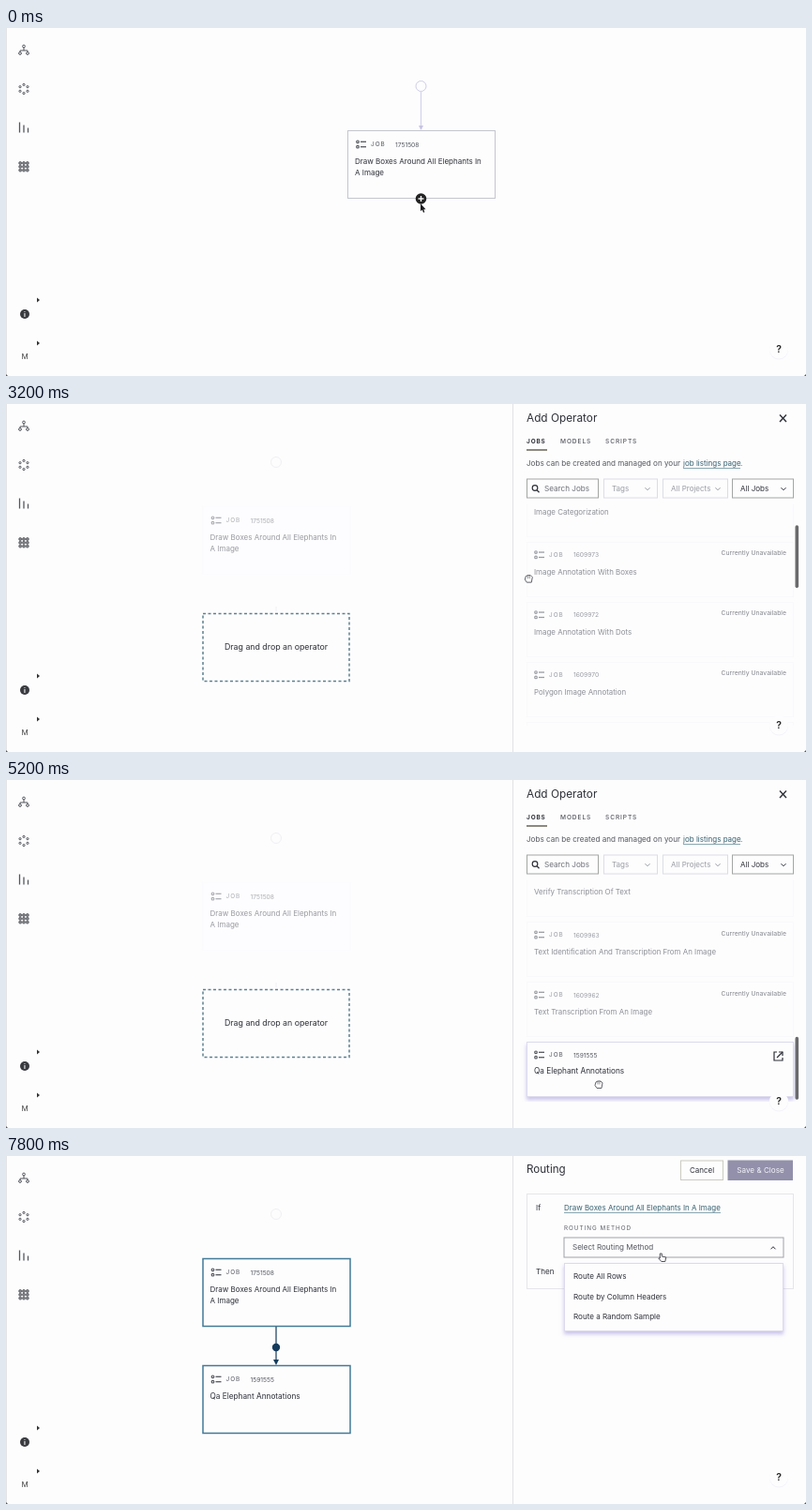
An HTML page with a canvas for the animation above (8 s loop, 853 px wide and 371 px high).

```html
<!DOCTYPE html>
<html lang="en">
<head>
<meta charset="utf-8">
<title>Workflow editor</title>
<style>
  html, body { margin: 0; width: 100%; height: 100%; overflow: hidden; background: #fdfdfe; }
  canvas { display: block; width: 853px; height: 371px; }
</style>
</head>
<body>
<canvas id="stage" width="853" height="371"></canvas>
<script>
const ctx = document.getElementById('stage').getContext('2d');
const W = 853, H = 371, LOOP = 8000, STEP = 200;
const PANEL_W = 312, NODE_SHIFT = 154.5, MAX_SCROLL = 589, ROW = 64;
const INK = '#2e3038', GREY = '#9a9ca3', PALE = '#f0f0f4', BLUE = '#427a96', NAVY = '#153b5c', PAPER = '#fdfdfe';

const JOBS = [
  ['1751508', 'Draw Boxes Around All Elephants In A Image'],
  ['1609975', 'Image Categorization'], ['1609973', 'Image Annotation With Boxes'],
  ['1609972', 'Image Annotation With Dots'], ['1609970', 'Polygon Image Annotation'],
  ['1609969', 'Pixel Labeling Of An Image'], ['1609968', 'Text Annotation'],
  ['1609967', 'Sentiment Of A Sentence'], ['1609965', 'Audio Transcription'],
  ['1609964', 'Verify Transcription Of Text'],
  ['1609963', 'Text Identification And Transcription From An Image'],
  ['1609962', 'Text Transcription From An Image'],
  ['1591555', 'Qa Elephant Annotations']
];
const QA_JOB = JOBS[JOBS.length - 1];

const clamp = v => Math.max(0, Math.min(1, v));
const smooth = u => u * u * (3 - 2 * u);

// keys: [time, value, value...], eased between neighbours
function track(t, keys) {
  const next = keys.findIndex(k => k[0] > t);
  if (next < 0) return keys[keys.length - 1].slice(1);
  if (next === 0) return keys[0].slice(1);
  const a = keys[next - 1], b = keys[next];
  const u = smooth((t - a[0]) / (b[0] - a[0]));
  return a.slice(1).map((v, i) => v + (b[i + 1] - v) * u);
}

function text(str, x, y, size = 8.05, color = INK, { weight = 400, spacing = 0, align = 'left' } = {}) {
  ctx.font = `${weight} ${size}px Inter, sans-serif`;
  ctx.letterSpacing = spacing + 'px';
  ctx.textAlign = align;
  ctx.textBaseline = 'middle';
  ctx.fillStyle = color;
  ctx.fillText(str, x, y);
}

function line(points, color = INK, width = 1) {
  ctx.strokeStyle = color;
  ctx.lineWidth = width;
  ctx.beginPath();
  points.forEach(([x, y]) => ctx.lineTo(x, y));
  ctx.stroke();
}

function polygon(points, fill, stroke) {
  ctx.beginPath();
  points.forEach(([x, y]) => ctx.lineTo(x, y));
  ctx.closePath();
  if (fill) { ctx.fillStyle = fill; ctx.fill(); }
  if (stroke) { ctx.strokeStyle = stroke; ctx.lineWidth = 1; ctx.stroke(); }
}

function circle(x, y, r, fill, stroke, width = 1) {
  ctx.beginPath();
  ctx.arc(x, y, r, 0, Math.PI * 2);
  if (fill) { ctx.fillStyle = fill; ctx.fill(); }
  if (stroke) { ctx.strokeStyle = stroke; ctx.lineWidth = width; ctx.stroke(); }
}

function box(x, y, w, h, stroke, fill, width = 1, dash = []) {
  if (fill) { ctx.fillStyle = fill; ctx.fillRect(x, y, w, h); }
  if (!stroke) return;
  ctx.setLineDash(dash);
  ctx.strokeStyle = stroke;
  ctx.lineWidth = width;
  ctx.strokeRect(x + .5, y + .5, w - 1, h - 1);
  ctx.setLineDash([]);
}

function raisedBox(x, y, w, h) {
  ctx.save();
  ctx.shadowColor = 'rgba(150,140,215,.5)';
  ctx.shadowBlur = 4;
  ctx.shadowOffsetY = 3;
  box(x, y, w, h, null, PAPER);
  ctx.restore();
  box(x, y, w, h, '#dcdaec');
}

function chevron(x, y, color, dir = 1) {
  line([[x - 2.5, y - 1.3 * dir], [x, y + 1.3 * dir], [x + 2.5, y - 1.3 * dir]], color);
}

function underlined(str, x, y, size, width) {
  text(str, x, y, size, '#35606f');
  line([[x, y + 4.5], [x + width, y + 4.5]], '#6f929e', .8);
}

function jobHeader(x, y, id, color) {
  for (const dy of [-2.7, 2.7]) {
    circle(x + 2, y + dy, 1.3, null, color, 1.2);
    line([[x + 5, y + dy], [x + 11, y + dy]], color, 1.3);
  }
  text('JOB', x + 16, y + .5, 6.4, color, { spacing: 1 });
  text(id, x + 42, y + .5, 6.7, color);
}

function sidebar() {
  const c = '#55575e';
  line([[19, 20], [19, 24], [15, 24], [15, 27]], c);
  line([[19, 24], [23, 24], [23, 27]], c);
  [[19, 19.5], [15, 27], [23, 27]].forEach(([x, y]) => circle(x, y, 1.4, PAPER, c));
  for (let i = 0; i < 6; i++) {
    const a = i * Math.PI / 3 + Math.PI / 6;
    circle(19 + 4.6 * Math.cos(a), 65 + 4.6 * Math.sin(a), 1.1, PAPER, c);
  }
  line([[14.5, 100.5], [14.5, 111.5]], c, 1.3);
  line([[19, 103.5], [19, 111.5]], c, 1.3);
  line([[23.5, 106.5], [23.5, 111.5]], c, 1.3);
  for (let i = 0; i < 9; i++) circle(15.2 + i % 3 * 3.8, 144 + Math.floor(i / 3) * 3.8, 1.5, '#85878c', c, .8);
  for (const y of [290, 336]) polygon([[33, y - 2.5], [36, y], [33, y + 2.5]], '#333');
  circle(20, 305, 5, '#3a3b40');
  text('i', 20, 305.5, 7, '#fff', { weight: 700, align: 'center' });
  text('M', 20, 351, 8, '#444', { align: 'center' });
}

function node(x, y, job, border) {
  box(x, y, 158, 73, border, PAPER, border === BLUE ? 1.5 : 1);
  jobHeader(x + 9, y + 15, job[0], '#55575e');
}

function flow(t, slide, connected) {
  const x = 364 - NODE_SHIFT * slide, mid = x + 78.5;
  const editing = slide > 0;
  circle(mid, 62, 5.5, null, editing ? PALE : '#cfcde6');
  if (!editing) {
    line([[mid, 68], [mid, 106]], '#d3d1ea', 1.2);
    polygon([[mid - 2.5, 104], [mid + 2.5, 104], [mid, 109]], '#c6c3e2');
  }
  ctx.globalAlpha = editing && !connected ? .48 : 1;
  node(x, 109, JOBS[0], connected ? BLUE : editing ? '#fafafc' : '#c4c6ce');
  text('Draw Boxes Around All Elephants In', x + 8, 143, 8);
  text('A Image', x + 8, 154.5, 8);
  ctx.globalAlpha = 1;

  if (!editing) {
    circle(mid, 182, 5.8, '#222');
    line([[mid - 3, 182], [mid + 3, 182]], '#fff', 1.4);
    line([[mid, 179], [mid, 185]], '#fff', 1.4);
  } else if (!connected) {
    line([[mid, 216], [mid, 221]], PALE);
    const over = t >= 5800;
    box(x, 223, 157, 73, over ? BLUE : '#5d818e', PAPER, 1.5, over ? [] : [3, 2.5]);
    text('Drag and drop an operator', mid, 259.5, 8.8, INK, { align: 'center' });
  } else {
    line([[mid, 182], [mid, 219]], NAVY, 1.2);
    circle(mid, 204, 4.2, NAVY);
    polygon([[mid - 3, 217], [mid + 3, 217], [mid, 223]], NAVY);
    node(x, 223, QA_JOB, BLUE);
    text(QA_JOB[1], x + 8, 257, 8.25);
  }
}

function filter(x, w, label, border, color) {
  box(x, 79.5, w, 21, border, PAPER);
  text(label, x + 9, 90.5, 8, color);
  chevron(x + w - 11, 90.5, color);
}

function loader(t) {
  const hop = i => -8 * Math.max(0, Math.sin(Math.PI * (t / 400 - .5 - (i - 1))));
  circle(681, 152.5 + hop(0), 4.8, '#d6b447');
  const y = 151.5 + hop(1);
  polygon([[697.5, y - 5.5], [702.3, y + 4.5], [692.7, y + 4.5]], '#34434f');
  box(709, 147.5 + hop(2), 10, 10, null, '#e0401c');
}

function jobCard(x, y, raised) {
  if (raised) raisedBox(x, y, 285, 59);
  else box(x, y, 285, 59, '#d8d9df', PAPER);
  jobHeader(x + 8, y + 14, QA_JOB[0], '#55575e');
  text(QA_JOB[1], x + 8, y + 32, 8.25);
}

function jobList(t, scroll) {
  ctx.save();
  ctx.beginPath();
  ctx.rect(545, 107, 300, 236);
  ctx.clip();
  JOBS.forEach((job, i) => {
    const y = 279 + MAX_SCROLL - scroll - (JOBS.length - 1 - i) * ROW;
    if (y < 40 || y > 345) return;
    if (job === QA_JOB) {
      if (t >= 5400) return;
      const hover = t >= 4800;
      jobCard(555, y, hover);
      if (hover) {
        line([[822, y + 11], [819, y + 11], [819, y + 20], [828, y + 20], [828, y + 17]], INK, 1.2);
        line([[822, y + 17], [828, y + 11]], INK, 1.2);
        line([[824, y + 11], [828, y + 11], [828, y + 15]], INK, 1.2);
      }
    } else {
      box(555, y, 285, 59, '#f9f9fb');
      jobHeader(563, y + 14, job[0], GREY);
      text('Currently Unavailable', 832, y + 12.5, 6.85, '#85878d', { align: 'right' });
      text(job[1], 563, y + 32.5, 7.92, '#8d8f96');
    }
  });
  ctx.restore();
  ctx.fillStyle = '#6a6a6d';
  ctx.beginPath();
  ctx.roundRect(841.5, 106 + scroll * .285, 3.6, 67, 1.8);
  ctx.fill();
}

function operatorPanel(t, scroll) {
  text('Add Operator', 555, 15, 11.8);
  line([[825, 11.5], [832, 19]], INK, 1.4);
  line([[832, 11.5], [825, 19]], INK, 1.4);
  text('JOBS', 555, 40, 6.4, INK, { weight: 700, spacing: .9 });
  text('MODELS', 591, 40, 6.6, '#55575e', { weight: 500, spacing: .9 });
  text('SCRIPTS', 639, 40, 6.6, '#55575e', { weight: 500, spacing: .9 });
  line([[555, 49], [577, 49]], '#5d5848', 1.4);
  text('Jobs can be created and managed on your', 555, 64, 8.1, '#55575e');
  underlined('job listings page', 722, 64, 8, 61);
  text('.', 783, 64, 8, '#55575e');
  box(555, 79.5, 77, 21, '#a3a6a3', PAPER);
  circle(564, 89.5, 2.8, null, INK, 1.2);
  line([[566, 91.7], [568.5, 94.2]], INK, 1.3);
  text('Search Jobs', 574, 90.5, 8.15, '#6c6e75');
  filter(637, 58, 'Tags', '#dcdce6', GREY);
  filter(700, 70, 'All Projects', '#dcdce6', GREY);
  filter(774, 66, 'All Jobs', '#a3a6a3', INK);
  if (t < 2900) loader(t);
  else jobList(t, scroll);
}

function routingPanel(open) {
  text('Routing', 555, 15, 11.6);
  box(719, 4.5, 46, 21.5, '#cbcac0', PAPER);
  text('Cancel', 742, 15.5, 8, INK, { align: 'center' });
  box(769.5, 4.5, 69.5, 21.5, null, '#9290aa');
  text('Save & Close', 804.5, 15.5, 8.15, '#f4f3f8', { align: 'center' });
  box(555, 40, 285, 102, '#e6e6ea');
  text('If', 565, 56);
  underlined(JOBS[0][1], 595, 56, 7.95, 167);
  text('ROUTING METHOD', 595, 77.5, 6.3, '#5f6168', { spacing: 1 });
  box(594.5, 86.5, 235, 22, '#a0a1a7', PAPER);
  text('Select Routing Method', 604, 98, 8.05, '#55575e');
  chevron(818, 98, INK, open ? -1 : 1);
  text('Then', 565, 124);
  if (!open) return underlined(QA_JOB[1], 595, 124, 8.25, 95);
  raisedBox(595, 114, 234, 73);
  ['Route All Rows', 'Route by Column Headers', 'Route a Random Sample']
    .forEach((label, i) => text(label, 605, 128.8 + i * 21.3));
}

function arrow(x, y) {
  polygon([[x, y], [x, y + 8], [x + 1.8, y + 6.5], [x + 3, y + 9.5], [x + 4.4, y + 9], [x + 3.2, y + 6.2], [x + 5.5, y + 6]], '#1b1b1e');
}

function pointer(x, y) {
  polygon([[x - 1, y - 3], [x + 1, y - 3], [x + 1, y], [x + 5.5, y + 1], [x + 4.5, y + 5.5], [x + .5, y + 5.5], [x - 2.5, y + 2], [x - 1, y + 2]], '#fff', '#505258');
}

function openHand(x, y, closed) {
  const top = closed ? y - 2 : y - 3.5;
  polygon([[x - 3, top + 1], [x - 1, top], [x + 2, top], [x + 4, top + 2], [x + 3, y + 4], [x - 2, y + 4], [x - 4, y + 1]], '#fff', '#606268');
  for (const dx of [-1, 1]) line([[x + dx, top], [x + dx, y]], '#606268', .7);
}

function cursor(t, x, y) {
  if (t < 200 || (t >= 1600 && t < 3000) || (t >= 6600 && t < 7200)) arrow(x, y);
  else if (t < 1600 || t >= 7200) pointer(x, y);
  else openHand(x, y, t >= 5400 && t < 6400);
}

function draw(t) {
  const slide = 1 - Math.pow(1 - clamp((t - 1000) / 600), 2.27);
  const connected = t >= 6600;
  const [scroll] = track(t, [[3000, 0], [3800, 520], [4000, 562], [4400, MAX_SCROLL]]);
  const [x, y] = track(t, [
    [0, 442, 187.3], [1600, 442, 187.3], [2400, 557.5, 185.5], [4200, 557, 187], [4800, 632, 324.5],
    [5200, 632, 324.5], [5400, 652, 321], [6000, 298, 273], [6400, 298, 273], [7200, 698.3, 107]
  ]);

  ctx.fillStyle = PAPER;
  ctx.fillRect(0, 0, W, H);
  flow(t, slide, connected);
  sidebar();

  if (slide > 0) {
    ctx.save();
    ctx.translate(Math.round(PANEL_W * (1 - slide)), 0);
    box(541, 0, PANEL_W, H, null, PAPER);
    line([[540.5, 0], [540.5, H]], '#e2e2e6');
    if (connected) routingPanel(t >= 7600);
    else operatorPanel(t, scroll);
    ctx.restore();
  }

  circle(824, 343.5, 10, '#f3f3f7');
  circle(824, 342.5, 10, PAPER);
  text('?', 824, 342.5, 10.5, '#222', { weight: 600, align: 'center' });

  if (t >= 5400 && t < 6600) {
    jobCard(x - 97, y - 42, true);
    circle(x, y - 1, 18, null, '#4a4c52', 1.1);
  }
  cursor(t, x, y);
  line([[.5, 0], [.5, H]], '#e4e4e6');
  polygon([[0, H - 2], [2, H], [0, H]], '#555');
  polygon([[W, H - 2], [W - 2, H], [W, H]], '#555');
}

function tick() {
  draw(Math.floor(performance.now() % LOOP / STEP) * STEP);
  requestAnimationFrame(tick);
}
tick();
</script>
</body>
</html>
```
